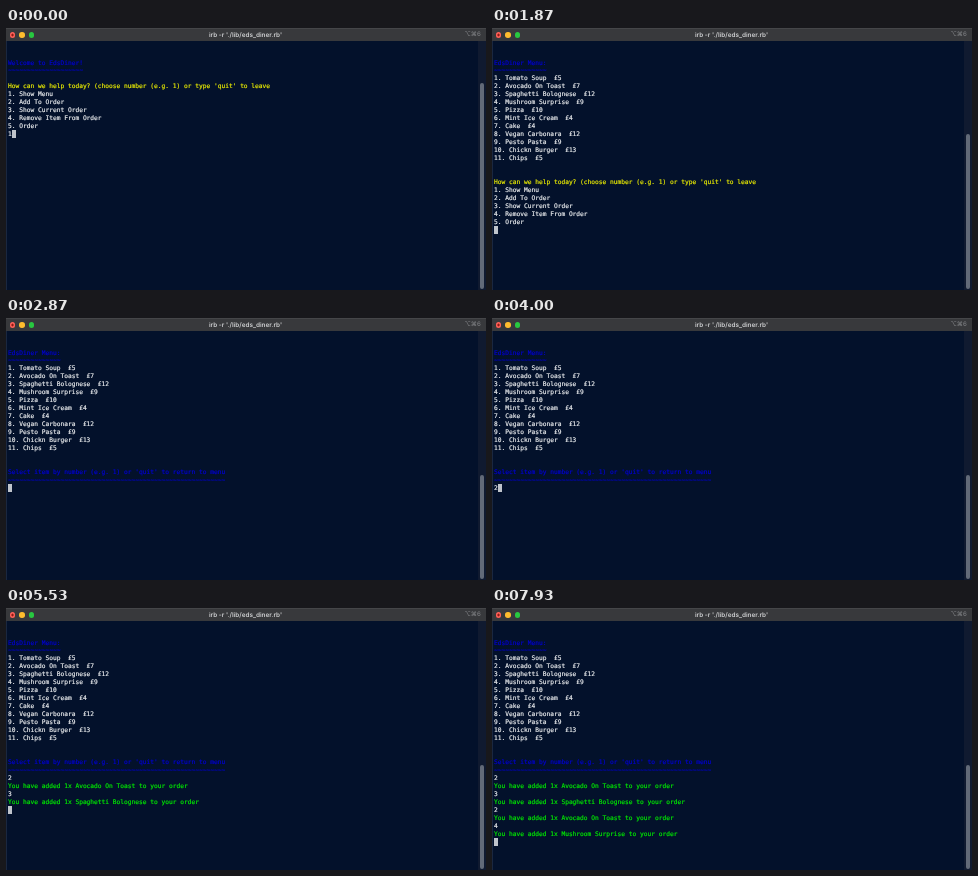
Recreate the animation shown at these times as an HTML page. Size 480x262 px, loop 8000 ms.

```html
<!DOCTYPE html>
<html lang="en">
<head>
<meta charset="utf-8">
<title>Terminal diner</title>
<style>
  html, body { margin: 0; width: 100%; height: 100%; overflow: hidden; background: #03112b; }
  #stage { position: relative; width: 480px; height: 262px; overflow: hidden; text-rendering: geometricPrecision; }
  #stage > * { position: absolute; box-sizing: border-box; }
  #bar { left: 0; top: 0; width: 480px; height: 13px; background: #38393c; border-top: 1px solid #454649; }
  #bar b { position: absolute; top: 3px; width: 5.6px; height: 5.6px; border-radius: 50%; }
  #title, #keys { top: 2px; line-height: 10px; white-space: pre; }
  #title { left: 0; width: 479px; text-align: center; color: #d0d1d3; font: 600 6.4px/10px Inter, sans-serif; }
  #keys { right: 5.2px; color: #85878a; font: 6.2px/10px Inter, "DejaVu Sans", sans-serif; }
  #track { left: 472px; top: 13px; width: 8px; height: 249px; background: #101a30; }
  #thumb { left: 474px; width: 4px; bottom: 1px; border-radius: 2px; background: #626a78; }
  #edge { left: 0; top: 13px; width: 1px; height: 249px; background: #1a2740; }
  #screen {
    left: 2px; top: 31.5px; margin: 0; color: #eceef0;
    font: 6.229px/7.97px "DejaVu Sans Mono", monospace; -webkit-text-stroke: 0.2px;
  }
  .blue { color: #0000cc; }
  .yellow { color: #eaec00; }
  .green { color: #00e800; }
  #screen i { position: relative; top: -1px; display: inline-block; width: 3.75px; height: 7.97px; vertical-align: top; background: #bfc4cb; }
</style>
</head>
<body>
<div id="stage">
  <div id="bar">
    <b style="left:3.5px;background:radial-gradient(#8c1a14 0.6px, #ff5f57 1.6px)"></b>
    <b style="left:13px;background:#febc2e"></b>
    <b style="left:22.5px;background:#28c840"></b>
  </div>
  <div id="title">irb -r './lib/eds_diner.rb'</div>
  <div id="keys">⌥⌘6</div>
  <div id="track"></div>
  <div id="thumb"></div>
  <div id="edge"></div>
  <pre id="screen"></pre>
</div>
<script>
const LOOP = 8000;
const terminal = document.getElementById("screen");
const thumb = document.getElementById("thumb");

const paint = (color, text) => `<span class="${color}">${text}</span>\n`;
const heading = text => paint("blue", text) + paint("blue", "~".repeat(text.length));
const numbered = list => list.map((item, i) => `${i + 1}. ${item}\n`).join("");
const added = dish => paint("green", `You have added 1x ${dish} to your order`);

const dishes = [
  ["Tomato Soup", 5], ["Avocado On Toast", 7], ["Spaghetti Bolognese", 12],
  ["Mushroom Surprise", 9], ["Pizza", 10], ["Mint Ice Cream", 4], ["Cake", 4],
  ["Vegan Carbonara", 12], ["Pesto Pasta", 9], ["Chickn Burger", 13], ["Chips", 5]
];
const menu = heading("EdsDiner Menu:") + numbered(dishes.map(([name, price]) => `${name}  £${price}`)) + "\n\n";
const options = paint("yellow", "How can we help today? (choose number (e.g. 1) or type 'quit' to leave") +
  numbered(["Show Menu", "Add To Order", "Show Current Order", "Remove Item From Order", "Order"]);

const welcome = heading("Welcome to EdsDiner!") + "\n" + options;
const browse = menu + options;
const select = menu + heading("Select item by number (e.g. 1) or 'quit' to return to menu");
const first = select + "2\n" + added("Avocado On Toast");
const second = first + "3\n" + added("Spaghetti Bolognese");
const third = second + "2\n" + added("Avocado On Toast");
const fourth = third + "4\n" + added("Mushroom Surprise");

// [start in ms, printed output, typed input]
const steps = [
  [0, welcome, "1"], [400, browse, ""], [2470, browse, "2"],
  [2870, select, ""], [3930, select, "2"],
  [4200, first, ""], [5070, first, "3"],
  [5530, second, ""], [6070, second, "2"],
  [6200, third, ""], [7070, third, "4"],
  [7200, fourth, ""]
];

let shown;
function draw(now) {
  const t = now % LOOP;
  const step = steps.findLast(([start]) => start <= t);
  if (step !== shown) {
    shown = step;
    terminal.innerHTML = step[1] + step[2] + "<i></i>";
  }
  thumb.style.top = (t < 470 ? 55 : t < 2870 ? 106 : 157) + "px";
}

const begin = performance.now();
function tick() {
  draw(performance.now() - begin);
  requestAnimationFrame(tick);
}
tick();
</script>
</body>
</html>
```
